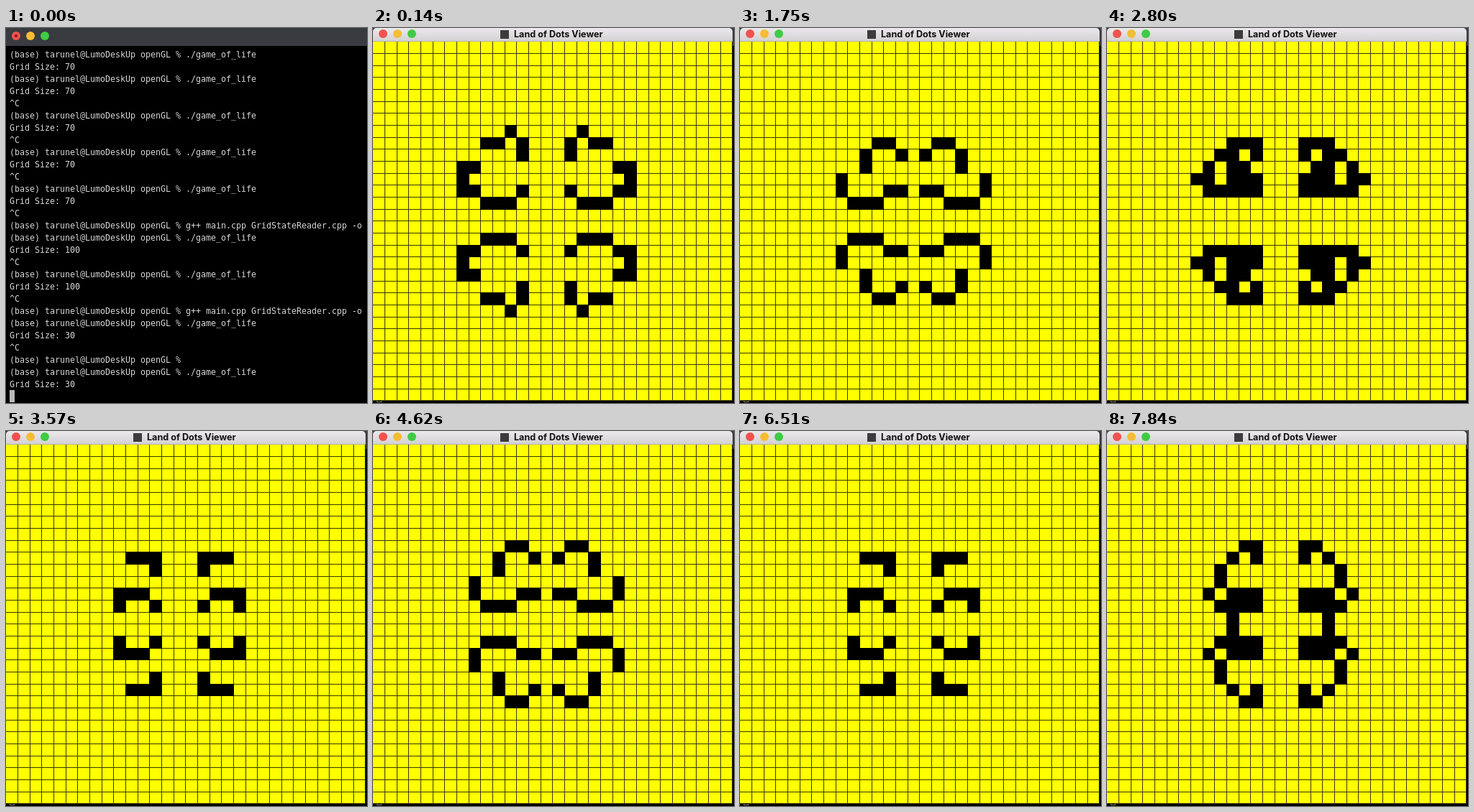
An HTML page with a canvas for the animation above (8000 ms loop, 502 by 522 pixels).

```html
<!DOCTYPE html>
<html lang="en">
<head>
<meta charset="utf-8">
<title>Cellular automaton</title>
<style>
  html, body { margin: 0; width: 100%; height: 100%; overflow: hidden; background: #000; }
  .stage { position: relative; width: 502px; height: 522px; overflow: hidden; background: #000; }
  .bar { position: absolute; left: 0; top: 0; width: 100%; height: 25px; background: #393b40; }
  .dot { position: absolute; width: 12px; height: 12px; border-radius: 50%; }
  .dot:nth-child(1) { left: 8px; background: #f0524f; }
  .dot:nth-child(2) { left: 28px; background: #f5bd35; }
  .dot:nth-child(3) { left: 48px; background: #3fcb45; }
  .bar .dot { top: 5px; }
  .bar .dot:first-child::after {
    content: ""; position: absolute; left: 4px; top: 4px;
    width: 4px; height: 4px; border-radius: 50%; background: #7c1512;
  }
  #log {
    position: absolute; left: 5px; top: 29px; margin: 0; color: #d6d6d6;
    font: 11.63px/17px "DejaVu Sans Mono", "Liberation Mono", monospace;
  }
  .cursor {
    position: absolute; left: 5px; top: 504px; width: 7px; height: 17px;
    box-sizing: border-box; background: #b9b9b9;
  }
  .behind .cursor { background: none; border: 1px solid #77776a; }
  .viewer { position: absolute; left: 0; top: 0; width: 500px; height: 519px; visibility: hidden; }
  .behind .viewer { visibility: visible; }
  .head {
    position: absolute; left: 0; top: 0; width: 500px; height: 19px;
    border-radius: 5px 5px 0 0; background: linear-gradient(#ebe9eb, #d2d0d2);
    box-shadow: inset 0 -1px #b4b2b4;
  }
  .head .dot { top: 2px; }
  .icon { position: absolute; left: 177px; top: 3px; width: 12px; height: 12px; background: #3c3c3c; }
  .name {
    position: absolute; left: 196px; top: 0; white-space: nowrap; color: #111;
    font: 700 12.6px/17px Inter, "Liberation Sans", sans-serif;
  }
  canvas { position: absolute; left: 0; top: 19px; display: block; }
</style>
</head>
<body>
<div class="stage" id="stage">
  <div class="bar"><i class="dot"></i><i class="dot"></i><i class="dot"></i></div>
  <pre id="log"></pre>
  <div class="cursor"></div>
  <div class="viewer">
    <div class="head">
      <i class="dot"></i><i class="dot"></i><i class="dot"></i>
      <i class="icon"></i><span class="name">Land of Dots Viewer</span>
    </div>
    <canvas id="grid" width="500" height="500"></canvas>
  </div>
</div>
<script>
const LOOP = 8000, OPEN = 140, SIZE = 30, PERIOD = 11, FIRST = 9;
const STEPS = [420, 700, 910, 1260, 1470, 1750, 1960, 2240, 2520, 2800, 3080, 3290,
  3570, 3850, 4130, 4410, 4620, 4970, 5180, 5460, 5740, 6020, 6230, 6510, 6790,
  7070, 7280, 7560, 7840];

// Terminal log
const prompt = "(base) tarunel@LumoDeskUp openGL % ";
const run = size => prompt + "./game_of_life\nGrid Size: " + size;
const stop = size => run(size) + "\n^C";
const build = prompt + "g++ main.cpp GridStateReader.cpp -o";
document.getElementById("log").textContent = [
  run(70), stop(70), stop(70), stop(70), stop(70),
  build, stop(100), stop(100),
  build, stop(30), prompt, run(30)
].join("\n");

// Upper left quarter of the oscillator, mirrored both ways
const QUARTER = ["..###", "....#", ".....", ".###.", ".#..#"];

function seed() {
  const cells = Array.from({ length: SIZE }, () => Array(SIZE).fill(0));
  QUARTER.forEach((line, i) => [...line].forEach((ch, j) => {
    if (ch !== "#") return;
    const y = 9 + i, x = 8 + j;
    for (const r of [y, 29 - y]) for (const c of [x, 28 - x]) cells[r][c] = 1;
  }));
  return cells;
}

function next(cells) {
  const at = (y, x) => cells[y]?.[x] ?? 0;
  return cells.map((row, y) => row.map((alive, x) => {
    let n = -alive;
    for (let dy = -1; dy <= 1; dy++)
      for (let dx = -1; dx <= 1; dx++) n += at(y + dy, x + dx);
    return n === 3 || (alive && n === 2) ? 1 : 0;
  }));
}

const phases = [seed()];
while (phases.length < PERIOD) phases.push(next(phases[phases.length - 1]));

const stage = document.getElementById("stage");
const ctx = document.getElementById("grid").getContext("2d");
const edgeX = i => Math.floor(16.66 * i);
const edgeY = i => Math.floor(16.66 * i + 18.9) - 19;

function draw(cells) {
  ctx.fillStyle = "#ffff00";
  ctx.fillRect(0, 0, 500, 500);
  ctx.fillStyle = "#38380c";
  for (let i = 1; i <= SIZE; i++) {
    ctx.fillRect(edgeX(i), 0, 1, 500);
    ctx.fillRect(0, edgeY(i), 500, 1);
  }
  ctx.fillStyle = "#000";
  cells.forEach((row, y) => row.forEach((alive, x) => {
    if (!alive) return;
    const left = edgeX(x), top = edgeY(y);
    ctx.fillRect(left, top, edgeX(x + 1) - left + 1, edgeY(y + 1) - top + 1);
  }));
}

let shown = -1;
const start = performance.now();

function frame() {
  const t = (performance.now() - start) % LOOP;
  stage.classList.toggle("behind", t >= OPEN);
  const phase = (FIRST + STEPS.filter(s => s <= t).length) % PERIOD;
  if (phase !== shown) draw(phases[shown = phase]);
  requestAnimationFrame(frame);
}
frame();
</script>
</body>
</html>
```
